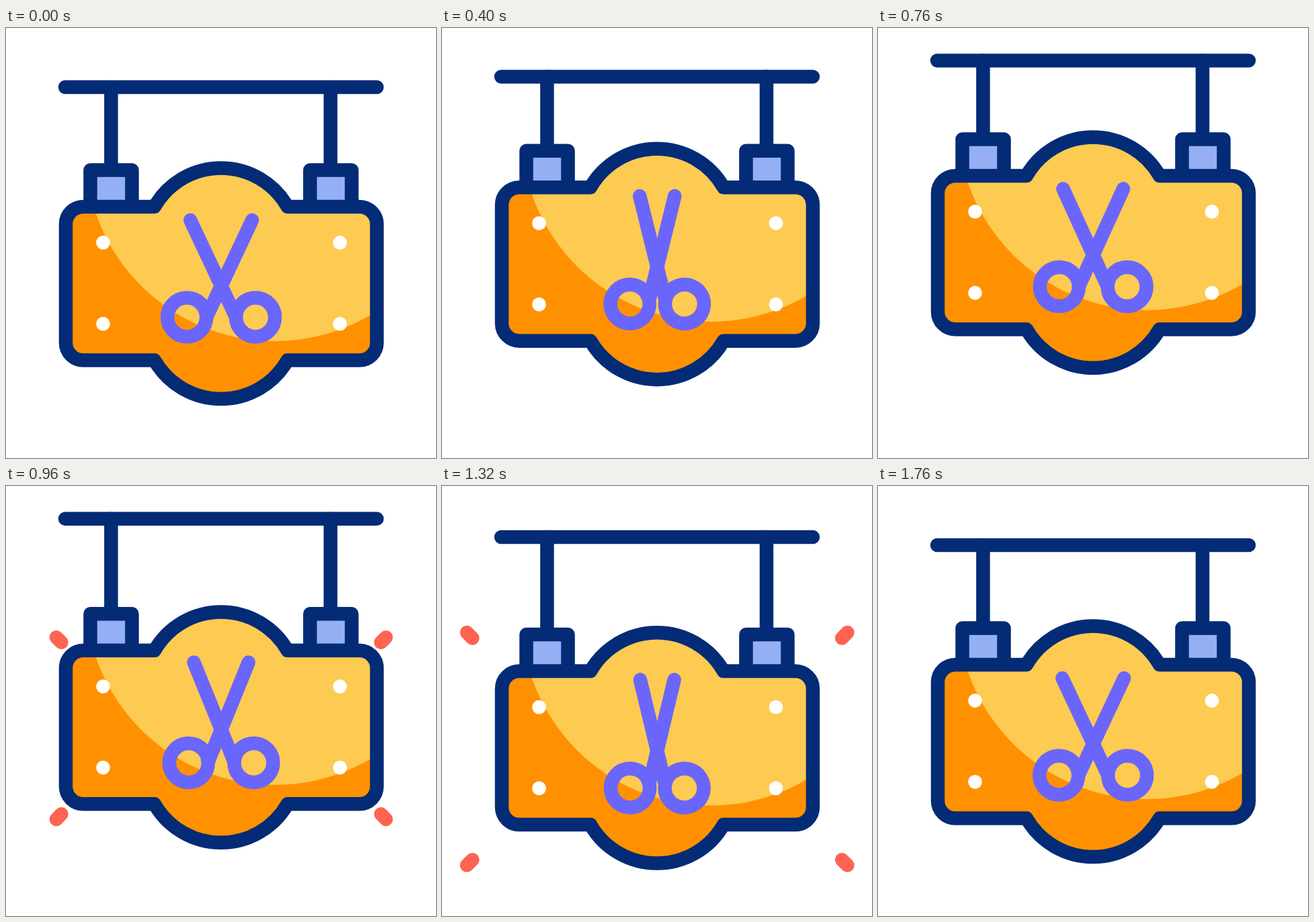
An HTML page that plays this animation: 640x640 px, repeating every 1800 ms.

```html
<!DOCTYPE html>
<html lang="en">
<head>
<meta charset="utf-8">
<title>Barber sign</title>
<style>
  html, body { margin: 0; width: 100%; height: 100%; overflow: hidden; background: #fff; }
  svg { display: block; width: 100%; height: 100%; }
  .line { fill: none; stroke: #032b76; stroke-width: 20.5; stroke-linecap: round; stroke-linejoin: round; }
  .cut { fill: none; stroke: #6a66fb; stroke-width: 20.5; stroke-linecap: round; }
  .ray { stroke: #ff6351; stroke-width: 20.5; stroke-linecap: round; }
</style>
</head>
<body>
<svg viewBox="0 0 640 640">
  <defs>
    <path id="plate" d="M115 266H221A114 114 0 0 1 419 266H526A26 26 0 0 1 552 292V468.500A26 26 0 0 1 526 494.500H419A114 114 0 0 1 221 494.500H115A26 26 0 0 1 89 468.500V292A26 26 0 0 1 115 266Z"/>
    <clipPath id="inside"><use href="#plate"/></clipPath>
    <g id="blade" class="cut">
      <path d="M46-97L-22 47.500"/>
      <circle cx="-51" cy="47.500" r="29"/>
    </g>
  </defs>
  <path id="rods" class="line"/>
  <path id="bar" class="line" d="M88 88H552"/>
  <g id="sign">
    <g id="rays"></g>
    <path class="line" style="fill:#94aff4" d="M125.500 266V211.500H187.500V266M452.500 266V211.500H514.500V266"/>
    <use href="#plate" fill="#ff9100"/>
    <circle cx="400" cy="184.500" r="281.500" fill="#fdca52" clip-path="url(#inside)"/>
    <use href="#plate" class="line"/>
    <g fill="#fff">
      <circle cx="144.500" cy="319.500" r="10.400"/>
      <circle cx="497" cy="319.500" r="10.400"/>
      <circle cx="144.500" cy="440.300" r="10.400"/>
      <circle cx="497" cy="440.300" r="10.400"/>
    </g>
    <g transform="translate(320.300 383)">
      <use id="bladeA" href="#blade"/>
      <g transform="scale(-1 1)"><use id="bladeB" href="#blade"/></g>
    </g>
  </g>
</svg>
<script>
  const LOOP = 1800, STEP = 40;

  // Each track is a list of [time in ms, value], eased in and out between keys.
  const tracks = {
    bar: [[160, 0], [720, -39.5], [925, -39.5], [1550, 0]],
    hang: [[160, 0], [560, -20.5], [1125, 28], [1150, 28], [1705, 0]],
    snip: [[40, 0], [460, 12], [812, 0], [1260, 12.2], [1760, 0]],
    rayOut: [[890, 0], [1160, 45.5]],
    rayIn: [[1080, 0], [1410, 45.5]]
  };

  function valueAt(track, t) {
    if (t <= track[0][0]) return track[0][1];
    for (let i = 1; i < track.length; i++) {
      const [t0, a] = track[i - 1], [t1, b] = track[i];
      if (t < t1) {
        const u = (t - t0) / (t1 - t0);
        return a + (b - a) * u * u * (3 - 2 * u);
      }
    }
    return track[track.length - 1][1];
  }

  const byId = id => document.getElementById(id);
  const sign = byId('sign'), bar = byId('bar'), rods = byId('rods');
  const blades = [byId('bladeA'), byId('bladeB')];

  const corners = [[82.5, 254, -1, -1], [558, 254, 1, -1], [82.5, 509.5, -1, 1], [558, 509.5, 1, 1]];
  const rays = corners.map(([x, y, dx, dy]) => {
    const el = document.createElementNS('http://www.w3.org/2000/svg', 'path');
    el.setAttribute('class', 'ray');
    byId('rays').append(el);
    return (from, to) => {
      const shown = to - from > 0.05;
      el.setAttribute('d', shown
        ? `M${x + dx * from} ${y + dy * from}L${x + dx * to} ${y + dy * to}` : '');
    };
  });

  function draw(t) {
    const barY = valueAt(tracks.bar, t);
    const signY = barY + valueAt(tracks.hang, t);
    const snip = valueAt(tracks.snip, t);
    const rayIn = valueAt(tracks.rayIn, t), rayOut = valueAt(tracks.rayOut, t);

    bar.setAttribute('transform', `translate(0 ${barY})`);
    sign.setAttribute('transform', `translate(0 ${signY})`);
    rods.setAttribute('d', [156.4, 483].map(x => `M${x} ${88 + barY}V${211.5 + signY}`).join(''));
    blades.forEach(b => b.setAttribute('transform', `rotate(${-snip})`));
    rays.forEach(ray => ray(rayIn, rayOut));
  }

  const start = performance.now();
  function tick() {
    const t = (performance.now() - start) % LOOP;
    draw(Math.floor(t / STEP) * STEP);
    requestAnimationFrame(tick);
  }
  draw(0);
  requestAnimationFrame(tick);
</script>
</body>
</html>
```
